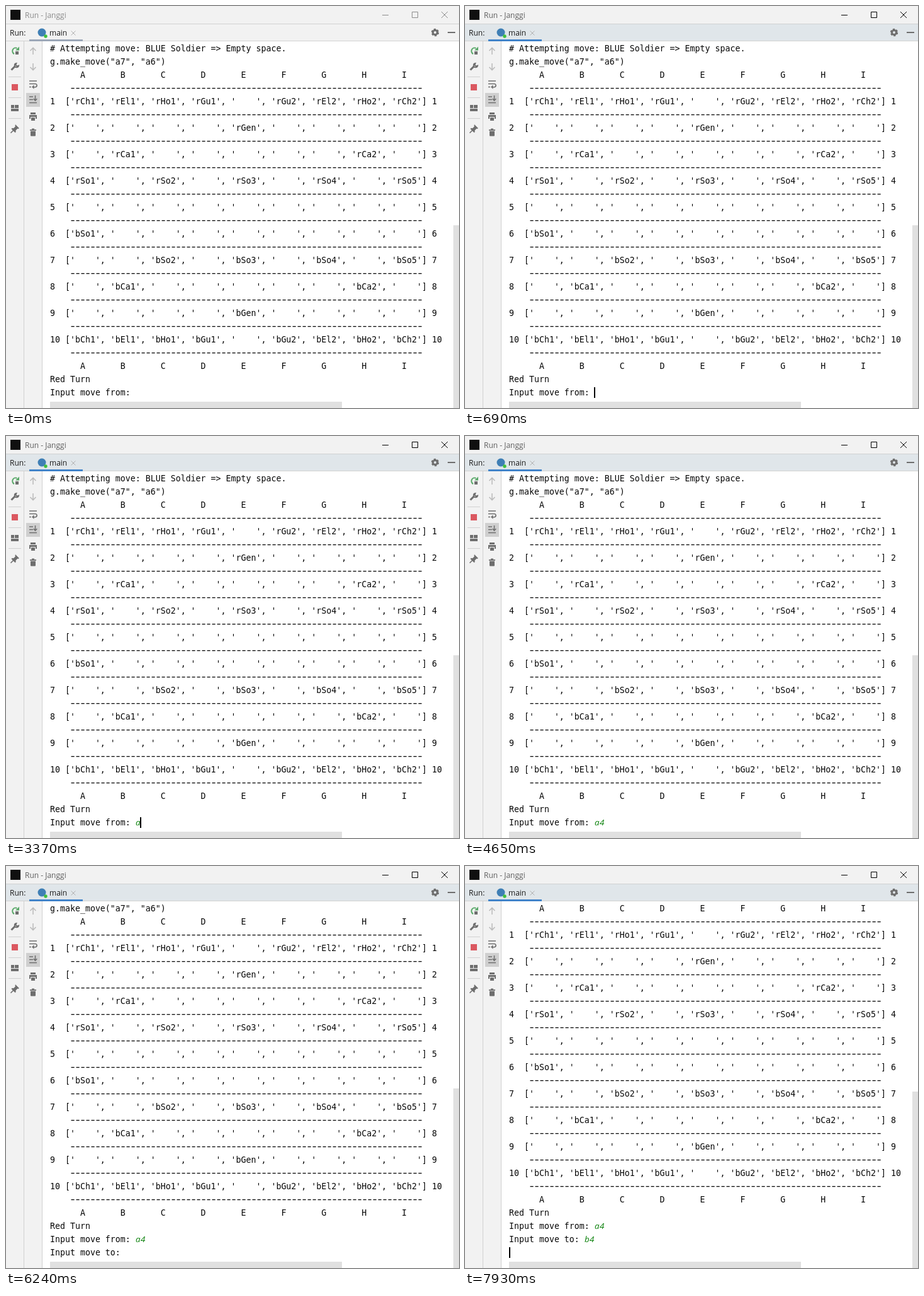
An HTML page that plays this animation: 720x638 px, repeating every 8000 ms.

```html
<!DOCTYPE html>
<html lang="en">
<head>
<meta charset="utf-8">
<title>Run - Janggi</title>
<style>
  html, body { margin: 0; width: 100%; height: 100%; overflow: hidden; background: #fff; }
  svg { display: block; width: 100%; height: 100%; }
  .ui { font: 12px "Open Sans", sans-serif; fill: #1a1a1a; }
  .mono { font: 13.288px "DejaVu Sans Mono", monospace; fill: #080808; white-space: pre; }
  .rule { font: 17px "Noto Sans Mono", monospace; letter-spacing: -2.2px; fill: #080808; }
  .typed { font: italic 13.333px "Open Sans", sans-serif; fill: #0a800a; }
  .line { fill: none; stroke: #6e6e6e; stroke-width: 1.6; }
  .solid { fill: #6e6e6e; }
  .edge { fill: none; stroke: #d1d1d1; }
</style>
</head>
<body>
<svg viewBox="0 0 720 638">
  <defs><clipPath id="view"><rect x="58" y="56" width="662" height="582"/></clipPath></defs>
  <rect width="720" height="638" fill="#f2f2f2"/>
  <rect x="58" y="56" width="662" height="582" fill="#fff"/>

  <!-- title bar -->
  <rect x="7" y="6" width="16" height="16" fill="#101010"/>
  <text id="title" class="ui" x="30" y="19">Run - Janggi</text>
  <path id="buttons" d="M598 14.5h10M645.5 9.5h9v9h-9zM692 9l10 10M702 9l-10 10" fill="none"/>

  <!-- tab row -->
  <rect id="header" y="28" width="720" height="28"/>
  <path class="edge" d="M0 28.5H720M0 55.5H720"/>
  <text class="ui" x="6" y="47">Run:</text>
  <circle cx="57" cy="42" r="6.5" fill="#3f7fb5"/>
  <circle cx="63" cy="48" r="2.7" fill="#3fc03f"/>
  <text class="ui" x="69" y="47">main</text>
  <path d="M103.5 39.5l7 7M110.5 39.5l-7 7" stroke="#b0b0b0"/>
  <rect id="underline" x="37" y="53" width="85" height="3"/>
  <circle class="line" cx="682" cy="42" r="3.5" style="stroke-width:3"/>
  <circle class="line" cx="682" cy="42" r="5.2" style="stroke-width:2;stroke-dasharray:3.2 2.245"/>
  <path class="line" d="M702 42h12" style="stroke-width:2"/>

  <!-- tool strips -->
  <path class="edge" d="M28.5 56V638M57.5 56V638M4 112.5H24M4 145.5H24M4 178.5H24"/>
  <path d="M17.5 67A5 5 0 1 0 13 76" fill="none" stroke="#59a869" stroke-width="2"/>
  <path d="M15 70.5h6v-6z" fill="#59a869"/>
  <rect class="solid" x="15" y="72" width="5" height="5"/>
  <path class="line" d="M8.5 101.5l6-6" style="stroke-width:3"/>
  <path class="line" d="M16.5 90.8a3.3 3.3 0 1 0 3.7 3.7l-3 1l-1.7-1.7z" style="stroke-width:1.8"/>
  <rect x="9" y="124" width="10" height="10" fill="#db5860"/>
  <path class="solid" d="M8 157h5v5h-5zM14 157h6v5h-6zM8 163h12v4h-12z"/>
  <path class="solid" d="M15 188l6 6l-1.5 1l-1-.5l-3 3l.2 2.5l-1.2 1l-6-6l1-1.2l2.5.2l3-3l-.7-1z"/>
  <path class="line" d="M12 197l-4.5 4.5"/>
  <path class="line" d="M43 77V66.5M38.5 71l4.5-4.5l4.5 4.5M43 91v10.5M38.5 97l4.5 4.5l4.5-4.5" style="stroke:#bcbcbc"/>
  <path class="line" d="M37 119h12M37 123.5h9.5a2.6 2.6 0 0 1 0 5.2H43M37 128.5h3"/>
  <path class="solid" d="M44.5 125.3v6.4l-3.5-3.2z"/>
  <rect x="32" y="138" width="22" height="22" fill="#cfcfcf"/>
  <path class="line" d="M37 144h6M37 148.5h6M37 153.5h12M46.5 142v8M43.7 147.3l2.8 2.8l2.8-2.8"/>
  <path class="solid" d="M39 169h8v3h-8zM37 173h12v6h-2v-3h-8v3h-2zM40 177h6v5h-6z"/>
  <path class="solid" d="M38 196h10v1.7h-10zM41 194.5h4v1.5h-4zM39 198.5h8v7q0 1-1 1h-6q-1 0-1-1z"/>

  <g clip-path="url(#view)">
    <g id="log"></g>
    <rect id="caret" y="605" width="2" height="17" fill="#000"/>
  </g>
  <rect id="thumb" x="711" width="9" height="300" fill="#e0e0e0"/>
  <rect x="70" y="628" width="464" height="10" fill="#e0e0e0"/>
</svg>
<script>
const LOOP = 8000, LEFT = 70, TOP = 72, CHAR = 8, LINE = 21;
const $ = id => document.getElementById(id);

const addText = (cls, x, row, text = '') => {
  const el = document.createElementNS('http://www.w3.org/2000/svg', 'text');
  el.setAttribute('class', cls);
  el.setAttribute('x', x);
  el.setAttribute('y', TOP + row * LINE);
  el.textContent = text;
  return $('log').appendChild(el);
};

// Ranks of the board; a dot is an empty point.
const ranks = [
  'rCh1 rEl1 rHo1 rGu1 . rGu2 rEl2 rHo2 rCh2',
  '. . . . rGen . . . .',
  '. rCa1 . . . . . rCa2 .',
  'rSo1 . rSo2 . rSo3 . rSo4 . rSo5',
  '. . . . . . . . .',
  'bSo1 . . . . . . . .',
  '. . bSo2 . bSo3 . bSo4 . bSo5',
  '. bCa1 . . . . . bCa2 .',
  '. . . . bGen . . . .',
  'bCh1 bEl1 bHo1 bGu1 . bGu2 bEl2 bHo2 bCh2'
];
const files = ' '.repeat(6) + [...'ABCDEFGHI'].join(' '.repeat(7));
const rule = '-'.repeat(70);
const showRank = (rank, i) => {
  const cells = rank.split(' ').map(c => `'${c === '.' ? '    ' : c}'`);
  return `${String(i + 1).padEnd(3)}[${cells.join(', ')}] ${i + 1}`;
};

const lines = [
  '# Attempting move: BLUE Soldier => Empty space.',
  'g.make_move("a7", "a6")',
  files,
  ...ranks.flatMap((rank, i) => [rule, showRank(rank, i)]),
  rule, files, 'Red Turn', 'Input move from: '
];
// Rules use a larger face for longer dashes, so they start one pixel earlier.
lines.forEach((text, row) => text === rule
  ? addText('rule', LEFT + 4 * CHAR - 1, row, text)
  : addText('mono', LEFT, row, text));

// Typed characters sit on the same 8 px grid as the console text.
const typedAt = (col, row) =>
  addText('typed', [0, 1].map(i => LEFT + (col + i) * CHAR).join(' '), row);
const from = typedAt(17, 26);
const prompt = addText('mono', LEFT, 27);
const to = typedAt(15, 27);

// Each step: start time and the values that change from there on.
const steps = [
  [0, { focus: 0, scroll: 0, from: '', prompt: '', to: '', caret: null }],
  [600, { focus: 1 }],
  [690, { focus: 2, caret: 17 }],
  [1090, { caret: null }],
  [1670, { caret: 17 }],
  [2170, { caret: null }],
  [2680, { caret: 17 }],
  [3160, { caret: null }],
  [3370, { from: 'a', caret: 18 }],
  [3950, { from: 'a4', caret: 19 }],
  [4650, { caret: null }],
  [5040, { scroll: 1, caret: 0 }],
  [5250, { prompt: 'Input move to: ', caret: 15 }],
  [6240, { caret: null }],
  [6550, { to: 'b', caret: 16 }],
  [6930, { to: 'b4', caret: 17 }],
  [7730, { caret: null }],
  [7930, { scroll: 2, caret: 0 }]
];
const stateAt = t => Object.assign({}, ...steps.filter(s => s[0] <= t).map(s => s[1]));

function draw(t) {
  const s = stateAt(t);
  $('title').style.fill = s.focus ? '#606060' : '#8c8c8c';
  $('buttons').setAttribute('stroke', s.focus ? '#000' : '#8c8c8c');
  $('header').setAttribute('fill', s.focus > 1 ? '#e0e6ea' : '#f2f2f2');
  $('underline').setAttribute('fill', s.focus > 1 ? '#4083c9' : '#9ca7b8');
  $('log').setAttribute('transform', `translate(0 ${-LINE * s.scroll})`);
  $('thumb').setAttribute('y', 348 + 5 * s.scroll);
  from.textContent = s.from;
  prompt.textContent = s.prompt;
  to.textContent = s.to;
  $('caret').setAttribute('visibility', s.caret === null ? 'hidden' : 'visible');
  $('caret').setAttribute('x', LEFT + s.caret * CHAR - (s.caret ? 1 : 0));
}

const start = performance.now();
function tick() {
  draw((performance.now() - start) % LOOP);
  requestAnimationFrame(tick);
}
tick();
</script>
</body>
</html>
```
